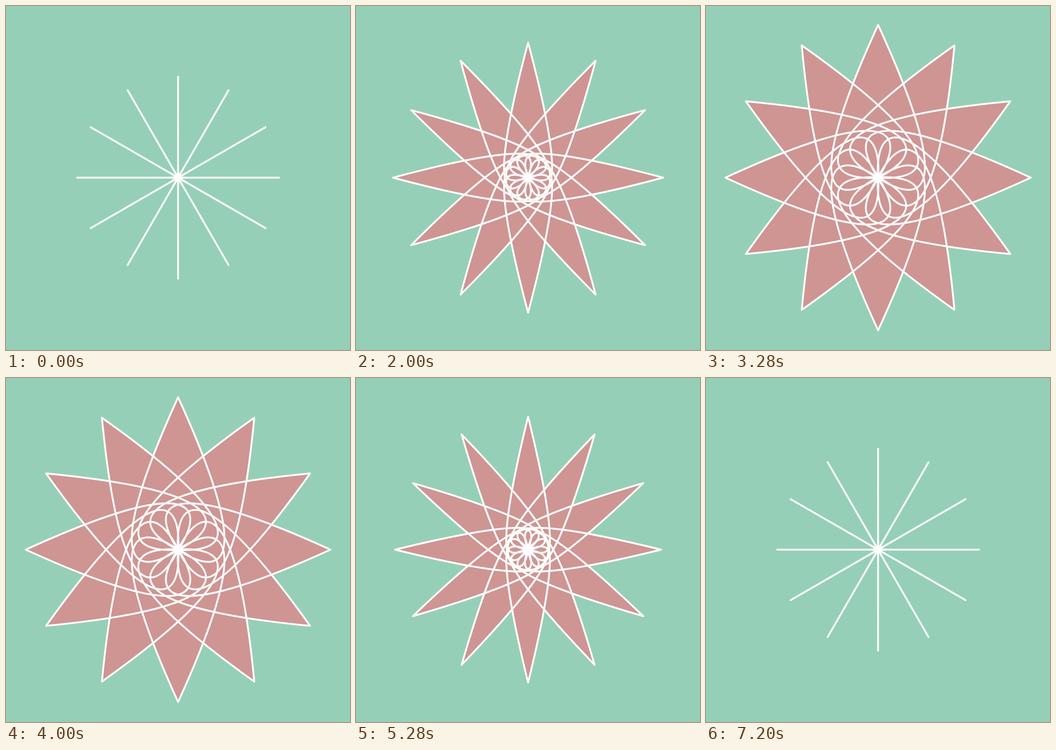
An HTML page without scripts that plays this animation: 748x748 px, repeating every 7.36 s.

```html
<!DOCTYPE html>
<html lang="en">
<head>
<meta charset="utf-8">
<title>Unfolding star</title>
<style>
  @property --step { syntax: "<number>"; inherits: true; initial-value: 0; }
  @property --x { syntax: "<number>"; inherits: true; initial-value: 0; }
  @property --t { syntax: "<number>"; inherits: true; initial-value: 0; }
  @property --open { syntax: "<number>"; inherits: true; initial-value: 0; }

  html, body { margin: 0; width: 100%; height: 100%; overflow: hidden; background: #96cfb8; }

  svg {
    display: block;
    width: 100%;
    height: 100%;
    animation: tick 7360ms steps(92) infinite;
    /* out and back, 45 steps each way, then a short rest */
    --x: calc(max(0, min(var(--step), 90 - var(--step))) / 45);
    /* ease curve cubic-bezier(.443, 0, .487, 1), solved with one Newton step */
    --t: calc(var(--x) - (.329 * var(--x) - 1.197 * var(--x) * var(--x) + .868 * var(--x) * var(--x) * var(--x))
      / (1.329 - 2.394 * var(--x) + 2.604 * var(--x) * var(--x)));
    --open: calc(var(--t) * var(--t) * (3 - 2 * var(--t)));
  }

  @keyframes tick { to { --step: 92; } }

  /* length and width of a unit petal */
  #petal {
    transform: scale(calc(219.5 + 113.7 * var(--open)),
      calc(.05 + var(--open) * (81 + 152 * var(--open))));
    vector-effect: non-scaling-stroke;
  }
</style>
</head>
<body>
<svg viewBox="0 0 748 748">
  <defs>
    <path id="petal" d="M-1 0C.5 -1 0 0 0 0C0 0 .5 1 -1 0Z"/>
    <g id="trio">
      <use href="#petal"/>
      <use href="#petal" transform="rotate(30)"/>
      <use href="#petal" transform="rotate(60)"/>
    </g>
    <g id="star">
      <use href="#trio"/>
      <use href="#trio" transform="rotate(90)"/>
      <use href="#trio" transform="rotate(180)"/>
      <use href="#trio" transform="rotate(270)"/>
    </g>
  </defs>
  <g transform="translate(374.2 373.2)">
    <use href="#star" fill="#ce9593"/>
    <use href="#star" fill="none" stroke="#fdfdfd" stroke-width="4" stroke-linecap="round" stroke-linejoin="round"/>
  </g>
</svg>
</body>
</html>
```
